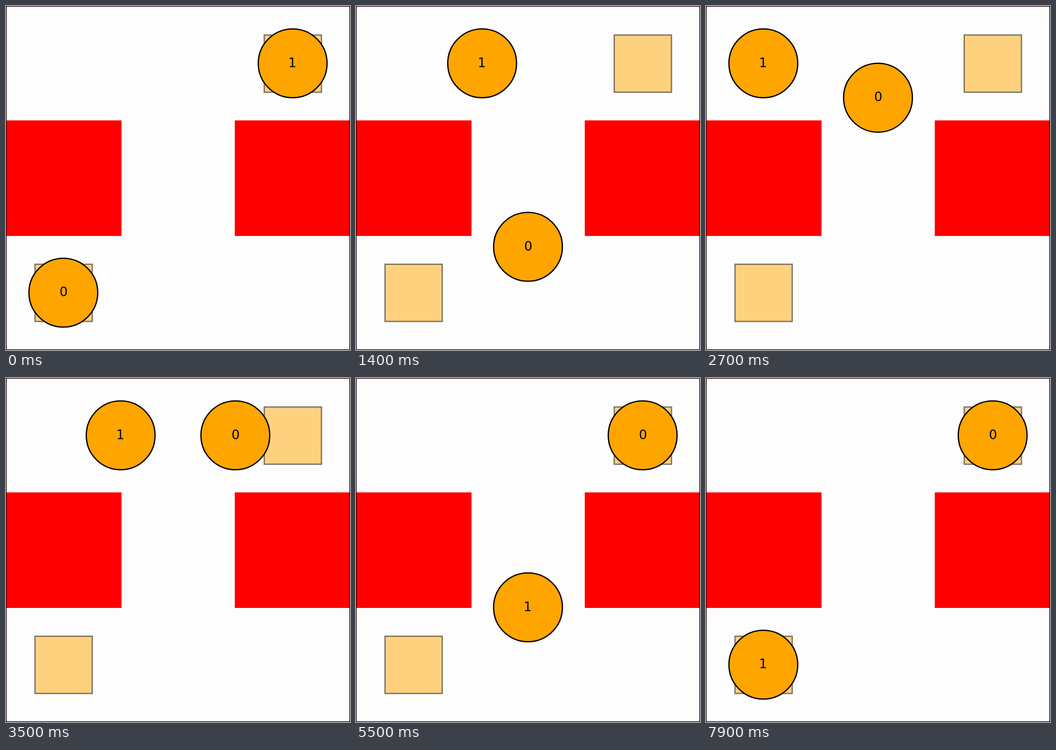
Write an HTML page with a canvas that moves like this. It is 748 px wide and 748 px high and loops after 8 s.

```html
<!DOCTYPE html>
<html lang="en">
<head>
<meta charset="utf-8">
<title>Two agents swapping corners</title>
<style>
  html, body { margin: 0; width: 100%; height: 100%; overflow: hidden; background: #fdfdfd; }
  canvas { display: block; }
</style>
</head>
<body>
<canvas id="stage" width="748" height="748"></canvas>
<script>
const ctx = document.getElementById('stage').getContext('2d');
const SIZE = 748;
const CELL = SIZE / 3;
const LINE = 2.78;
const STEP = 100;          // ms per tick
const TICKS_PER_CELL = 10;
const LOOP = 8000;

// Grid cells (column, row) visited, one per second; repeats mean waiting.
const agents = [
  { label: '0', dx: 0.7, path: [[0, 2], [1, 2], [1, 1], [1, 0], [2, 0]] },
  { label: '1', dx: -0.7, path: [[2, 0], [1, 0], [0, 0], [0, 0], [1, 0], [1, 1], [1, 2], [0, 2]] }
];

function positionAt(path, tick) {
  const last = path.length - 1;
  const p = Math.min(tick / TICKS_PER_CELL, last);
  const i = Math.floor(p);
  const a = path[i];
  const b = path[Math.min(i + 1, last)];
  return a.map((v, k) => (v + (b[k] - v) * (p - i) + 0.5) * CELL);
}

function drawGoal(x, y) {
  ctx.globalAlpha = 0.5;
  ctx.fillStyle = '#ffa500';
  ctx.strokeStyle = '#000';
  ctx.fillRect(x, y, 124.5, 124.5);
  ctx.strokeRect(x, y, 124.5, 124.5);
  ctx.globalAlpha = 1;
}

function drawAgent({ label, dx, path }, tick) {
  const [x, y] = positionAt(path, tick);
  ctx.beginPath();
  ctx.arc(x, y, CELL * 0.3, 0, Math.PI * 2);
  ctx.fillStyle = '#ffa500';
  ctx.fill();
  ctx.strokeStyle = '#000';
  ctx.stroke();
  ctx.fillStyle = '#000';
  ctx.fillText(label, x + dx, y + 8);
}

function draw(time) {
  const tick = Math.floor((time % LOOP) / STEP);
  ctx.fillStyle = '#fdfdfd';
  ctx.fillRect(0, 0, SIZE, SIZE);
  ctx.lineWidth = LINE;
  ctx.font = '27.78px "DejaVu Sans", sans-serif';
  ctx.textAlign = 'center';
  ctx.textBaseline = 'alphabetic';

  drawGoal(63, 561.5);
  drawGoal(561.5, 63);

  ctx.fillStyle = '#f00';
  ctx.fillRect(0, 248.7, 251.2, 251.3);
  ctx.fillRect(497.5, 248.7, SIZE - 497.5, 251.3);

  ctx.strokeStyle = '#200000';
  ctx.strokeRect(0, 0, SIZE, SIZE);

  agents.forEach(agent => drawAgent(agent, tick));
}

const start = performance.now();
function loop() {
  draw(performance.now() - start);
  requestAnimationFrame(loop);
}
loop();
</script>
</body>
</html>
```
